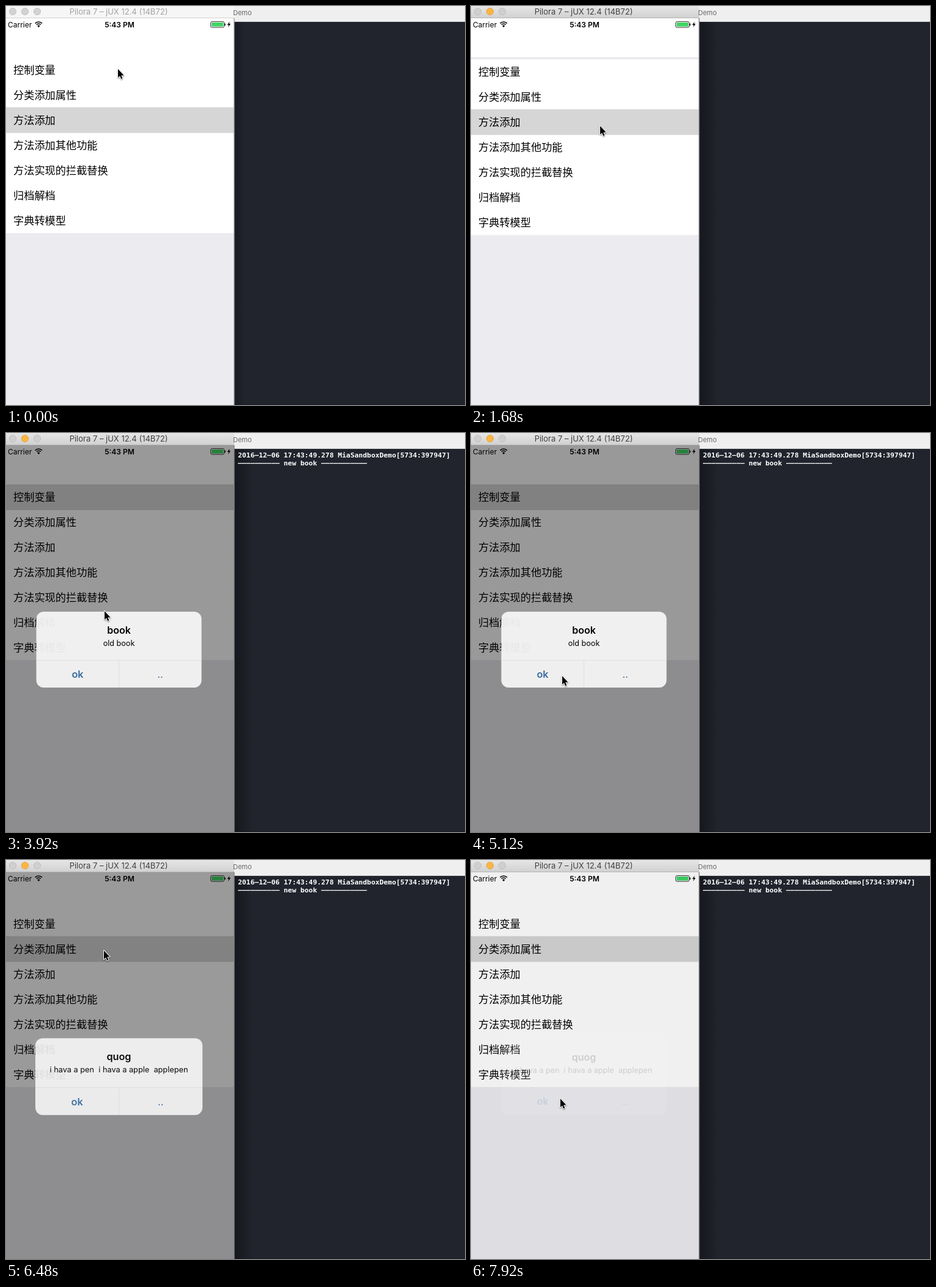
These frames come from a looping animation (750x652 px, 8 s). An HTML page with a canvas:

```html
<!DOCTYPE html>
<html lang="zh-CN">
<head>
<meta charset="utf-8">
<title>Simulator demo</title>
<style>
html, body { margin: 0; width: 100%; height: 100%; overflow: hidden; background: #21242d; }
canvas { display: block; width: 750px; height: 652px; }
</style>
</head>
<body>
<canvas id="stage" width="750" height="652"></canvas>
<script>
const ctx = document.getElementById('stage').getContext('2d');
const LOOP = 8000, STEP = 80;
const SANS = 'Inter, Roboto, sans-serif';
const CJK = '"Noto Sans CJK SC", "Noto Sans CJK", sans-serif';
const MONO = '"DejaVu Sans Mono", monospace';
const PHONE_W = 372, LIST_Y = 84, ROW_H = 41;
const ROWS = ['控制变量', '分类添加属性', '方法添加', '方法添加其他功能',
  '方法实现的拦截替换', '归档解档', '字典转模型'];

const ACTIVATE = 960, RELEASE = 1360, LOG_AT = 2640;
const ALERTS = [
  { open: 2652, close: 5245, row: 0, title: 'book', text: 'old book' },
  { open: 6267, close: 7772, row: 1, title: 'quog', text: 'i hava a pen  i hava a apple  applepen' }
];

// Pointer stops: time, x, y
const PATH = [
  [0, 182, 102], [150, 182, 102], [160, 182, 103], [390, 182, 103], [400, 183, 104],
  [960, 183, 104], [1360, 208, 184], [1680, 210, 195], [1840, 210, 195],
  [2440, 181, 104], [3400, 181, 104], [4240, 150, 379], [4960, 148, 396],
  [5320, 148, 396], [5840, 155, 163], [6120, 159, 147], [6920, 159, 147],
  [7680, 145, 389], [8000, 145, 389]
];

const smooth = u => u * u * (3 - 2 * u);

function pointerAt(t) {
  let i = 1;
  while (i < PATH.length - 1 && PATH[i][0] < t) i++;
  const [t0, x0, y0] = PATH[i - 1], [t1, x1, y1] = PATH[i];
  const u = smooth(Math.min(1, Math.max(0, (t - t0) / (t1 - t0))));
  return [x0 + (x1 - x0) * u, y0 + (y1 - y0) * u];
}

// What is left of a critically damped spring after ms
function springLeft(ms, speed) {
  const x = Math.max(0, ms) / 1000 * speed;
  return Math.exp(-x) * (1 + x);
}

function listOffset(t) {
  if (t < ACTIVATE || t > 2300) return 0;
  if (t < RELEASE) return (pointerAt(t)[1] - 104) * 0.5;
  return 40 * springLeft(t - RELEASE, 13);
}

function rect(x, y, w, h, fill) {
  ctx.fillStyle = fill;
  ctx.fillRect(x, y, w, h);
}

function label(str, x, y, font, fill, align = 'left') {
  ctx.font = font;
  ctx.fillStyle = fill;
  ctx.textAlign = align;
  ctx.fillText(str, x, y);
}

function gradient(x0, y0, x1, y1, from, to) {
  const g = ctx.createLinearGradient(x0, y0, x1, y1);
  g.addColorStop(0, from);
  g.addColorStop(1, to);
  return g;
}

function polygon(points, fill) {
  ctx.beginPath();
  points.forEach(([x, y]) => ctx.lineTo(x, y));
  ctx.closePath();
  ctx.fillStyle = fill;
  ctx.fill();
}

function drawConsole(t) {
  rect(PHONE_W, 0, 378, 26, '#efefef');
  rect(PHONE_W, 25, 378, 1, '#d4d4d6');
  rect(PHONE_W, 26, 378, 626, '#21242d');
  rect(PHONE_W, 651, 378, 1, '#1a1c23');
  const spread = t >= ACTIVATE ? 30 : 18;
  rect(373, 26, spread, 626, gradient(373, 0, 373 + spread, 0,
    t >= ACTIVATE ? 'rgba(0,0,0,.36)' : 'rgba(0,0,0,.24)', 'rgba(0,0,0,0)'));
  if (t >= LOG_AT) {
    const font = 'bold 11.3px ' + MONO;
    label('2016–12–06 17:43:49.278 MiaSandboxDemo[5734:397947]', 379, 40, font, '#fff');
    label('–'.repeat(10) + ' new book ' + '–'.repeat(11), 379, 53, font, '#fff');
  }
}

function drawTitleBar(active) {
  rect(0, 0, 373, 20, active ? gradient(0, 0, 0, 20, '#e6e6e6', '#d0d0d0') : '#f6f6f6');
  rect(0, 19, 373, 1, active ? '#b4b4b4' : '#d2d2d2');
  [11, 31, 51].forEach((x, i) => {
    const lit = active && i === 1;
    ctx.beginPath();
    ctx.arc(x, 9, 5.6, 0, Math.PI * 2);
    ctx.fillStyle = lit ? '#fdb541' : active ? '#cfcfcf' : '#d3d3d3';
    ctx.fill();
    ctx.lineWidth = 0.8;
    ctx.strokeStyle = lit ? '#dd9a34' : '#b9b9b9';
    ctx.stroke();
  });
  label('Pilora 7 – jUX 12.4 (14B72)', 184, 14, '13px ' + SANS, active ? '#404040' : '#a3a3a3', 'center');
}

function drawStatusBar() {
  label('Carrier', 3, 35, '12px ' + SANS, '#000');
  label('5:43 PM', 185.5, 35, '600 12px ' + SANS, '#000', 'center');
  ctx.strokeStyle = '#000';
  ctx.lineWidth = 1.6;
  [8, 5].forEach(r => {
    ctx.beginPath();
    ctx.arc(53.3, 34, r, -Math.PI * 0.75, -Math.PI * 0.25);
    ctx.stroke();
  });
  ctx.beginPath();
  ctx.moveTo(53.3, 35);
  ctx.arc(53.3, 34.5, 3, -Math.PI * 0.75, -Math.PI * 0.25);
  ctx.fillStyle = '#000';
  ctx.fill();
  ctx.lineWidth = 0.8;
  ctx.beginPath();
  ctx.roundRect(334.5, 25.5, 22, 9.5, 2);
  ctx.stroke();
  rect(336, 27, 19, 6.5, '#3fd465');
  rect(357.3, 28.5, 1.3, 3.6, '#000');
  polygon([[365.5, 25.5], [361.5, 31], [364, 31], [362.8, 35], [367, 29.3], [364.5, 29.3]], '#000');
}

function drawList(offset, selected) {
  const top = LIST_Y + offset;
  rect(0, 20, PHONE_W, 632, '#ebebf0');
  rect(0, top, PHONE_W, ROW_H * ROWS.length, '#fff');
  ROWS.forEach((name, i) => {
    const y = top + i * ROW_H;
    if (i === selected) rect(0, y - (i ? 0.5 : 0), PHONE_W, ROW_H + 1, '#d6d6d6');
    label(name, 12, y + 27, '17.2px ' + CJK, '#000');
  });
  rect(0, 20, PHONE_W, LIST_Y - 20, '#fff');
  if (offset > 0.5) rect(0, LIST_Y, PHONE_W, 1, '#e2e2e5');
}

function drawAlert(t, a) {
  if (t < a.open) return;
  const shown = 1 - springLeft(t - a.open, 22.8);
  const left = t < a.close ? 1 : springLeft(t - a.close, 22.8);
  if (left < 0.01) return;
  rect(0, 20, PHONE_W, 632, `rgba(0,0,0,${0.4 * Math.min(1, shown * 1.04) * left})`);

  const scale = 1 + 0.25 * (1 - shown);
  ctx.save();
  ctx.beginPath();
  ctx.rect(0, 20, PHONE_W, 632);
  ctx.clip();
  ctx.translate(184.5, 354);
  ctx.scale(scale, scale);
  ctx.globalAlpha = shown * left;
  ctx.beginPath();
  ctx.roundRect(-135, -62, 270, 124, 12);
  ctx.fillStyle = 'rgba(246,246,246,.94)';
  ctx.fill();
  rect(-135, 17, 270, 0.7, '#d9d9db');
  rect(-0.4, 17, 0.7, 45, '#d9d9db');
  label(a.title, 0, -26.5, '600 16px ' + SANS, '#000', 'center');
  label(a.text, 0, -6.5, '12.6px ' + SANS, '#000', 'center');
  label('ok', -67.5, 46, '600 16.3px ' + SANS, '#386c9e', 'center');
  label('..', 67.5, 46, '16.5px ' + SANS, '#386c9e', 'center');
  ctx.restore();
}

function drawPointer([x, y]) {
  ctx.save();
  ctx.translate(Math.round(x) + 1, Math.round(y) + 1);
  const arrow = [[0, 0], [0, 14], [3.1, 11.2], [5.3, 16.2], [7.4, 15.3], [5.3, 10.4], [9.6, 10.2]];
  ctx.shadowColor = 'rgba(0,0,0,.4)';
  ctx.shadowBlur = 2;
  ctx.shadowOffsetY = 1;
  polygon(arrow, '#000');
  ctx.lineWidth = 2;
  ctx.lineJoin = 'round';
  ctx.strokeStyle = '#fff';
  ctx.stroke();
  ctx.shadowColor = 'transparent';
  polygon(arrow, '#000');
  ctx.restore();
}

function draw(t) {
  const active = t >= ACTIVATE;
  const selected = ALERTS.reduce((row, a) => t >= a.open - 80 ? a.row : row, 2);
  drawConsole(t);
  drawList(listOffset(t), selected);
  drawStatusBar();
  ALERTS.forEach(a => drawAlert(t, a));
  drawTitleBar(active);
  rect(PHONE_W, 20, 1.5, 632, active ? '#85868a' : '#a2a3a6');
  label('Demo', 371, 15, '11px ' + SANS, '#686868');
  drawPointer(pointerAt(t));
}

const start = performance.now();
function tick() {
  const t = (performance.now() - start) % LOOP;
  draw(Math.floor(t / STEP) * STEP);
  requestAnimationFrame(tick);
}
tick();
</script>
</body>
</html>
```
